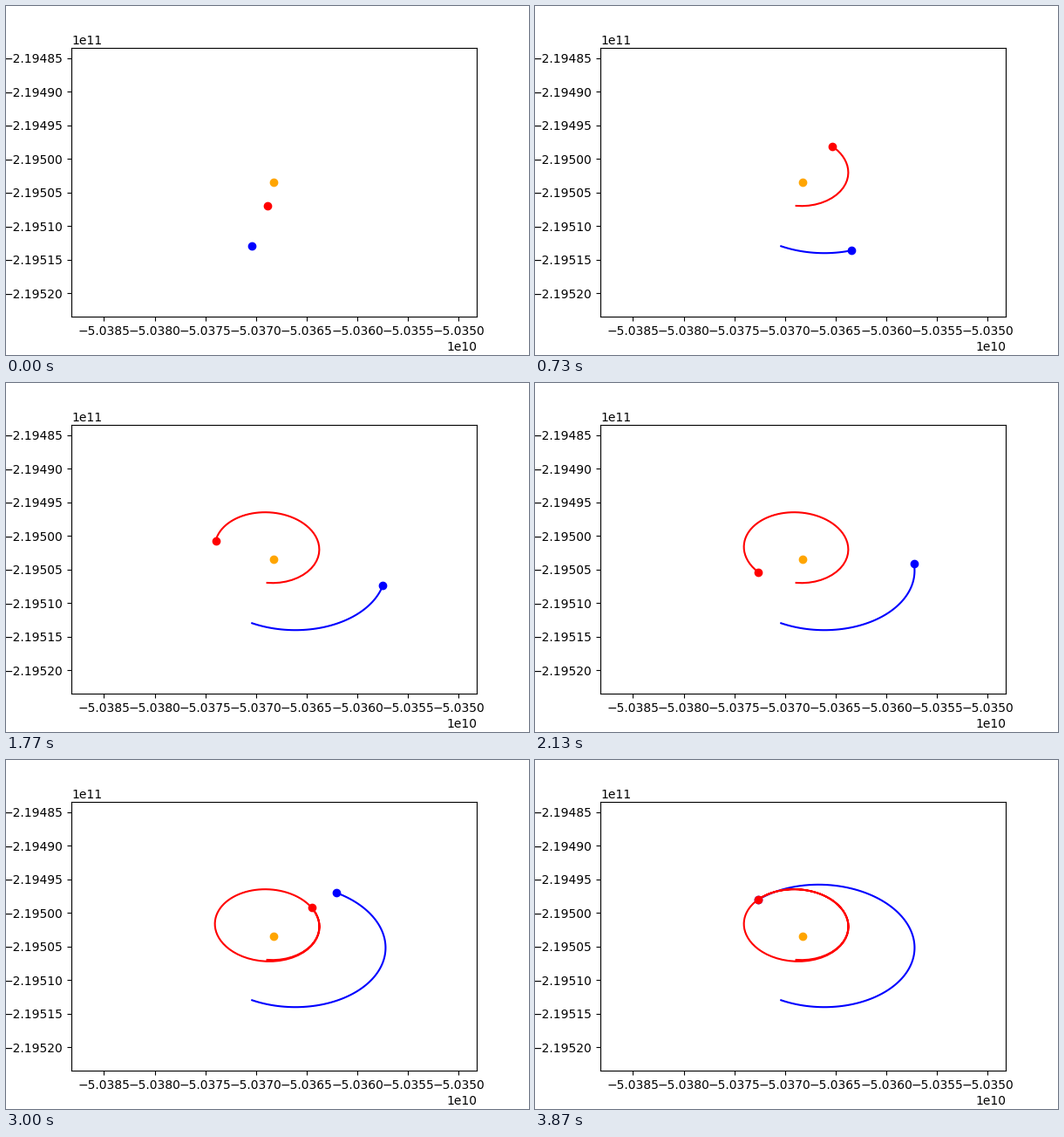
Animation of 600 by 400 pixels, one loop 3.91 s. Source, as a matplotlib script:

```python
import numpy as np
import matplotlib.pyplot as plt
from matplotlib.animation import FuncAnimation

STEPS = 117        # simulation steps, 30 per second
TICK_MS = 10       # clock on which the steps are shown
LOOP_MS = 3910
STAR = np.array([-5.0368221e10, -2.19503474e11])
HALF_SPAN = 2e7


def kepler_path(a, e, omega, m0, rate, lag=0.0):
    """Positions at every step of an orbit with the star in one focus.

    Angles are in degrees; lag pulls the launch point slightly inwards.
    """
    n = np.arange(STEPS)
    mean = np.radians(m0 + rate * n)
    ecc = mean.copy()
    for _ in range(20):
        ecc -= (ecc - e * np.sin(ecc) - mean) / (1 - e * np.cos(ecc))
    u = a * (np.cos(ecc) - e)
    v = a * np.sqrt(1 - e * e) * np.sin(ecc)
    c, s = np.cos(np.radians(omega)), np.sin(np.radians(omega))
    shrink = 1 - lag * np.exp(-n / 5)
    return STAR[0] + shrink * (c * u - s * v), STAR[1] + shrink * (s * u + c * v)


outer = kepler_path(9.297e6, 0.249, 141.8, 87.6, 2.285)
inner = kepler_path(5.411e6, 0.325, -67.4, -16.6, 5.065, lag=0.063)

fig, ax = plt.subplots(figsize=(6, 4), dpi=100)
fig.subplots_adjust(left=0.125, right=0.9, bottom=0.11, top=0.88)
ax.set_xlim(STAR[0] - HALF_SPAN, STAR[0] + HALF_SPAN)
ax.set_ylim(STAR[1] - HALF_SPAN, STAR[1] + HALF_SPAN)
ax.ticklabel_format(useOffset=False)

ax.plot(*STAR[:, None], "o", color="orange")
bodies = []
for path, color in ((outer, "blue"), (inner, "red")):
    trail, = ax.plot([], [], color=color, lw=1.5)
    dot, = ax.plot([], [], "o", color=color)
    bodies.append((path, trail, dot))


def update(tick):
    # step k begins at k/30 s, rounded to the clock
    k = min((3 * tick + 1) // 10, STEPS - 1)
    for (x, y), trail, dot in bodies:
        trail.set_data(x[:k + 1], y[:k + 1])
        dot.set_data([x[k]], [y[k]])
    return [artist for _, *pair in bodies for artist in pair]


anim = FuncAnimation(fig, update, frames=LOOP_MS // TICK_MS, interval=TICK_MS,
                     repeat=True, repeat_delay=0)
plt.show()
```
